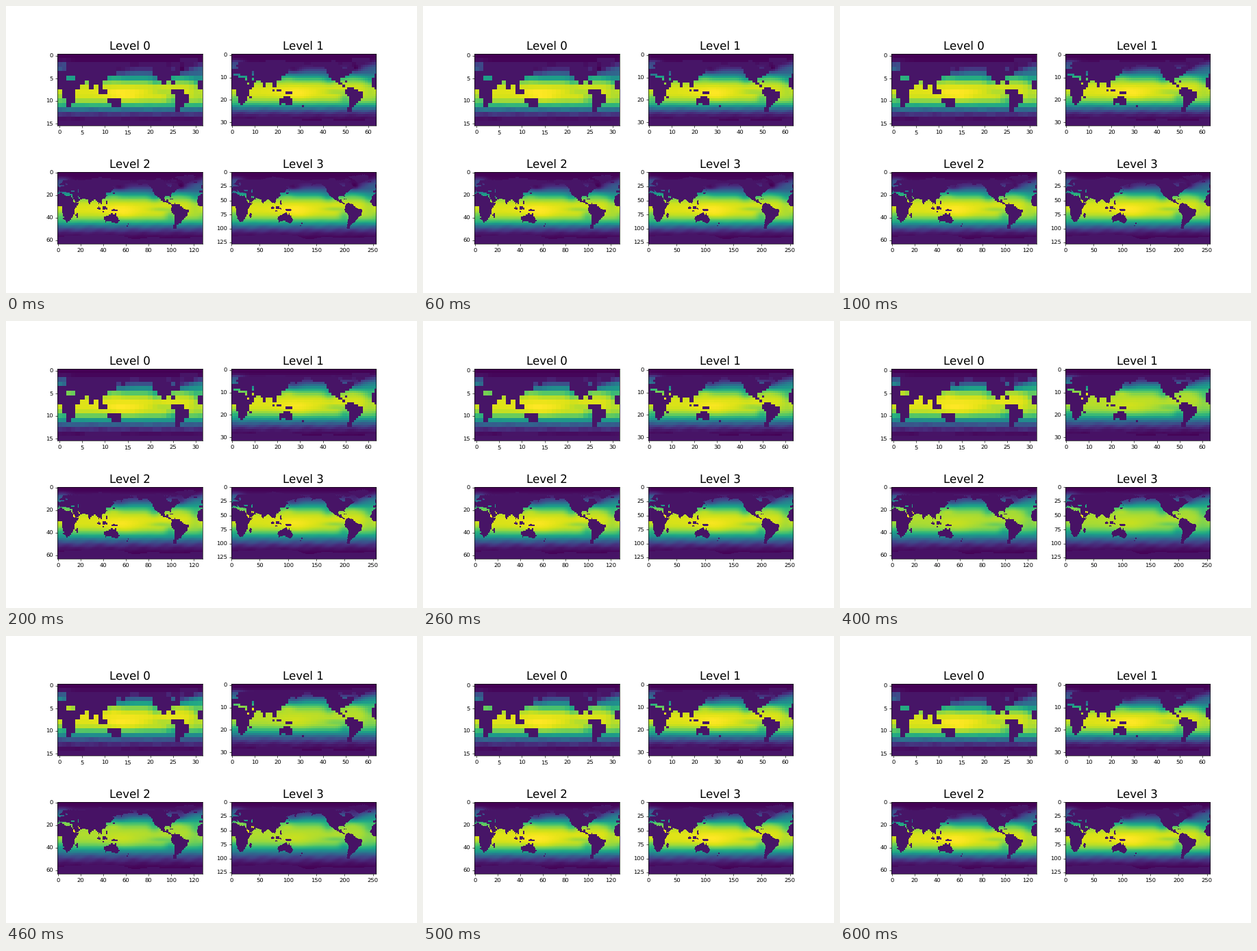
A matplotlib script for the animation above (700 ms loop, 600x420 px).

```python
import numpy as np
import matplotlib.pyplot as plt
from matplotlib.animation import FuncAnimation
from matplotlib.path import Path

STEPS, STEP_MS = 7, 100
ROWS, COLS = 128, 256
W, H = 600, 420
ICE = -1.8

plt.rcParams.update({"text.hinting": "none", "xtick.major.pad": 4.5})

LON, LAT = np.meshgrid(np.arange(COLS) * 360 / COLS,
                       90 - np.arange(ROWS) * 180 / ROWS)
rng = np.random.default_rng(4)
# A slight jitter of the sampling points makes the coasts ragged
jitter_x, jitter_y = rng.normal(0, .4, (2, ROWS, COLS))


def gap(x):
    """Signed distance in longitude, wrapped around the globe."""
    return (LON - x + 180) % 360 - 180


def bump(x, y, wx, wy):
    return np.exp(-(gap(x) / wx) ** 2 - ((LAT - y) / wy) ** 2)


def polygon(*points):
    path = Path(points)
    x, y = (LON + jitter_x).ravel(), (LAT + jitter_y).ravel()
    hit = [path.contains_points(np.column_stack([x - turn, y])) for turn in (0, 360)]
    return np.any(hit, axis=0).reshape(ROWS, COLS)


def ellipse(x, y, rx, ry):
    return ((gap(x) + jitter_x) / rx) ** 2 + ((LAT - y + jitter_y) / ry) ** 2 < 1


def make_land():
    africa = polygon(
        (-9, 32), (-5, 36), (10, 37), (20, 31), (33, 31), (43, 12), (51, 12),
        (40, -4), (40, -15), (33, -26), (27, -34), (18, -34), (12, -17), (9, 4),
        (-8, 4.5), (-17, 15))
    eurasia = polygon(
        (-9, 37), (-9, 43), (-1, 44), (-4, 48.5), (8, 54), (20, 55), (5, 59),
        (15, 69), (27, 71), (60, 69), (104, 77), (140, 72), (190, 66), (163, 60),
        (157, 51), (155, 59), (136, 54), (140, 48), (128, 37), (119, 39),
        (122, 30), (109, 20.5), (108, 11), (100, 13), (104, 2), (98, 15),
        (91, 22), (80, 15), (77.5, 8), (73, 21), (57, 26), (60, 22), (45, 13),
        (35, 28), (36, 36), (27, 37), (23, 38), (13, 45), (16, 39), (4, 43.5),
        (-2, 37))
    north_america = polygon(
        (-168, 66), (-156, 71), (-95, 68), (-82, 69), (-94, 59), (-80, 52),
        (-77, 62), (-65, 60), (-56, 52), (-65, 45), (-75, 38), (-81, 31),
        (-80, 25.5), (-84, 30), (-97, 28), (-95, 18.5), (-88, 21), (-83, 14),
        (-78, 8), (-95, 15.5), (-105, 20), (-113, 31), (-110, 23), (-124, 40),
        (-124, 48), (-137, 59), (-150, 60), (-164, 55), (-160, 60))
    south_america = polygon(
        (-77, 8), (-72, 12), (-60, 9), (-50, 0), (-35, -6), (-39, -18),
        (-48, -26), (-57, -37), (-65, -42), (-68, -54), (-74, -51), (-73, -37),
        (-70, -19), (-81, -5), (-79, 2))
    australia = polygon(
        (114, -22), (116, -35), (131, -31.5), (146, -39), (153, -30), (146, -19),
        (142, -11), (140, -17.5), (136, -12), (129, -14.5), (122, -18))
    greenland = polygon((-73, 78), (-33, 83), (-18, 80), (-23, 70), (-43, 60), (-54, 68))
    antarctica = LAT < (-70 + 4 * np.cos(np.radians(LON - 110))
                        - 8 * np.exp(-((LON - 190) / 25) ** 2))
    land = (africa | eurasia | north_america | south_america | australia
            | greenland | antarctica)

    # Red Sea, then the inland seas and the Gulf
    land &= ~polygon((33, 29), (36, 28), (44, 13), (41, 13))
    for sea in ((35, 43, 6, 1.7), (51, 42, 2, 4.5), (52, 27, 3.5, 2), (20, 60, 2.5, 4)):
        land &= ~ellipse(*sea)
    islands = (
        (47, -19, 2.3, 6), (174, -39, 1.6, 2), (170, -44, 1.8, 1.6),
        (141, -5.5, 7, 2.8), (114, 1, 4, 4.5), (102, 0, 3.5, 3.5),
        (110, -7.5, 4.5, .9), (121, -2, 1.6, 2.5), (122, 13, 1.8, 5),
        (138, 36, 3, 1.8), (142.5, 43, 2, 2), (-2, 53.5, 2.5, 4),
        (-19, 65, 4, 1.5), (-74, 69, 8, 4), (-110, 71, 9, 3), (-79, 21.8, 4.5, .9))
    for island in islands:
        land |= ellipse(*island)
    return land


def make_climate():
    """Yearly mean sea temperature and the swing of the seasons around it."""
    mean = ICE + 29.5 * np.exp(-(np.abs(LAT - 3) / 46.5) ** 2.8)
    swing = (4.8 * np.exp(-((LAT - 42) / 22) ** 2)
             - 2.8 * np.exp(-((LAT + 33) / 18) ** 2))

    # Cold water along the eastern shores of the oceans
    for x, y in ((240, 29), (280, -18), (343, 23), (8, -19)):
        mean -= 4.3 * bump(x, y, 14, 13)
    # Cold tongue, cool Atlantic and cold northern currents
    mean -= 3 * bump(255, -3, 28, 5) + 2 * bump(340, -5, 18, 16)
    mean -= 4.5 * (bump(305, 53, 12, 9) + bump(152, 50, 20, 8))
    # Warm pools and the North Atlantic drift
    mean += 1.5 * (bump(155, -2, 45, 14) + bump(165, -18, 35, 9))
    mean += 2.2 * (bump(298, 32, 20, 8) + bump(138, 30, 16, 8))
    mean += 5 * (bump(350, 57, 25, 10) + bump(10, 68, 18, 8))

    # Enclosed seas heat up most
    for x, y, wx, wy, heat in ((18, 37, 20, 6, 2), (52, 27, 5, 4, 4), (39, 20, 5, 7, 3)):
        mean += 2 * bump(x, y, wx, wy)
        swing += heat * bump(x, y, wx, wy)

    ripple = np.sin(np.radians(4 * LON + 9 * LAT)) + np.sin(np.radians(9 * LON - 14 * LAT))
    mean += .5 * ripple * np.exp(-((LAT + 50) / 15) ** 2)
    return mean, swing


def panel(level):
    x = 75 + level % 2 * 253.5
    y = 70 + level // 2 * 173
    w, h = 211.8, 105.3
    ax = fig.add_axes([x / W, 1 - (y + h) / H, w / W, h / H])
    im = ax.imshow(shrink(mean, level), aspect="auto", interpolation="nearest")
    ax.set_title(f"Level {level}", fontsize=20)
    return im


def shrink(grid, level):
    k = 2 ** (3 - level)
    return grid[::k, ::k]


land = make_land()
mean, swing = make_climate()
fig = plt.figure(figsize=(10, 7), dpi=60)
images = [panel(level) for level in range(4)]


def update(i):
    season = np.cos(2 * np.pi * (i - 3.4) / STEPS)
    temp = np.where(land, 0, np.maximum(mean + season * swing, ICE))
    for level, im in enumerate(images):
        im.set_data(shrink(temp, level))
        im.autoscale()
    return images


anim = FuncAnimation(fig, update, frames=STEPS, interval=STEP_MS, repeat=True)
plt.show()
```
